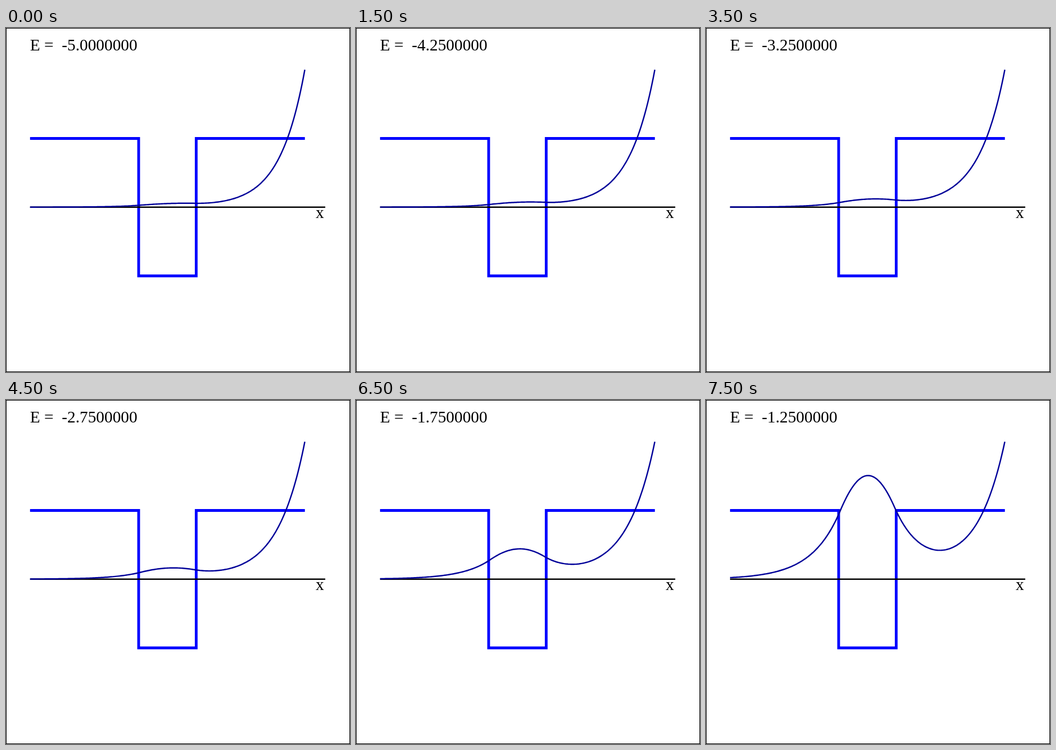
An HTML page for the animation above (8 s loop, 612 by 612 pixels).

```html
<!DOCTYPE html>
<html lang="en">
<head>
<meta charset="utf-8">
<title>Finite square well</title>
<style>
  html, body { margin: 0; width: 100%; height: 100%; overflow: hidden; background: #fff; }
  svg { display: block; width: 100vw; height: 100vh; }
  path { fill: none; }
  text { font: 29.33px "Liberation Serif", Times, serif; white-space: pre; }
</style>
</head>
<body>
<svg viewBox="0 0 612 612">
  <rect x="0.5" y="0.5" width="611" height="611" fill="#fff" stroke="#000"/>
  <path d="M42.8 196.5H236V441H338.4V196.5H531.7" stroke="#00f" stroke-width="4.9"/>
  <path d="M42.8 318.7H568" stroke="#000" stroke-width="2.45"/>
  <path id="wave" stroke="#000099" stroke-width="2.45" stroke-linejoin="round"/>
  <text id="energy" x="42.8" y="40"></text>
  <text x="551" y="338">x</text>
</svg>
<script>
  const STEP_MS = 500, STEPS = 16;
  const UNIT = 244.4, CX = 287.2, CY = 318.7;
  const EDGE = 0.1975, DEPTH = 10;
  const wave = document.getElementById("wave");
  const label = document.getElementById("energy");

  // Solution of psi'' = 2(V - E)psi that decays to the left, scaled to psi(1) = 1.
  function waveFunction(E) {
    const k = Math.sqrt(2 * (E + DEPTH));
    const q = Math.sqrt(2 * (DEPTH - E));
    const inside = d => Math.cos(k * d) + q / k * Math.sin(k * d);
    const width = 2 * EDGE;
    const value = inside(width);
    const slope = q * Math.cos(k * width) - k * Math.sin(k * width);
    const psi = x => {
      if (x < -EDGE) return Math.exp(q * (x + EDGE));
      if (x < EDGE) return inside(x + EDGE);
      const d = q * (x - EDGE);
      return value * Math.cosh(d) + slope / q * Math.sinh(d);
    };
    const end = psi(1);
    return x => psi(x) / end;
  }

  function draw(step) {
    const E = -5 + step * 0.25;
    const psi = waveFunction(E);
    const points = [];
    for (let i = -100; i <= 100; i++) {
      const x = i / 100;
      points.push((CX + UNIT * x).toFixed(2) + " " + (CY - UNIT * psi(x)).toFixed(2));
    }
    wave.setAttribute("d", "M" + points.join("L"));
    label.textContent = "E =  " + E.toFixed(7);
  }

  const start = performance.now();
  let shown = -1;
  function tick() {
    const step = Math.floor((performance.now() - start) / STEP_MS) % STEPS;
    if (step !== shown) draw(shown = step);
    requestAnimationFrame(tick);
  }
  tick();
</script>
</body>
</html>
```
